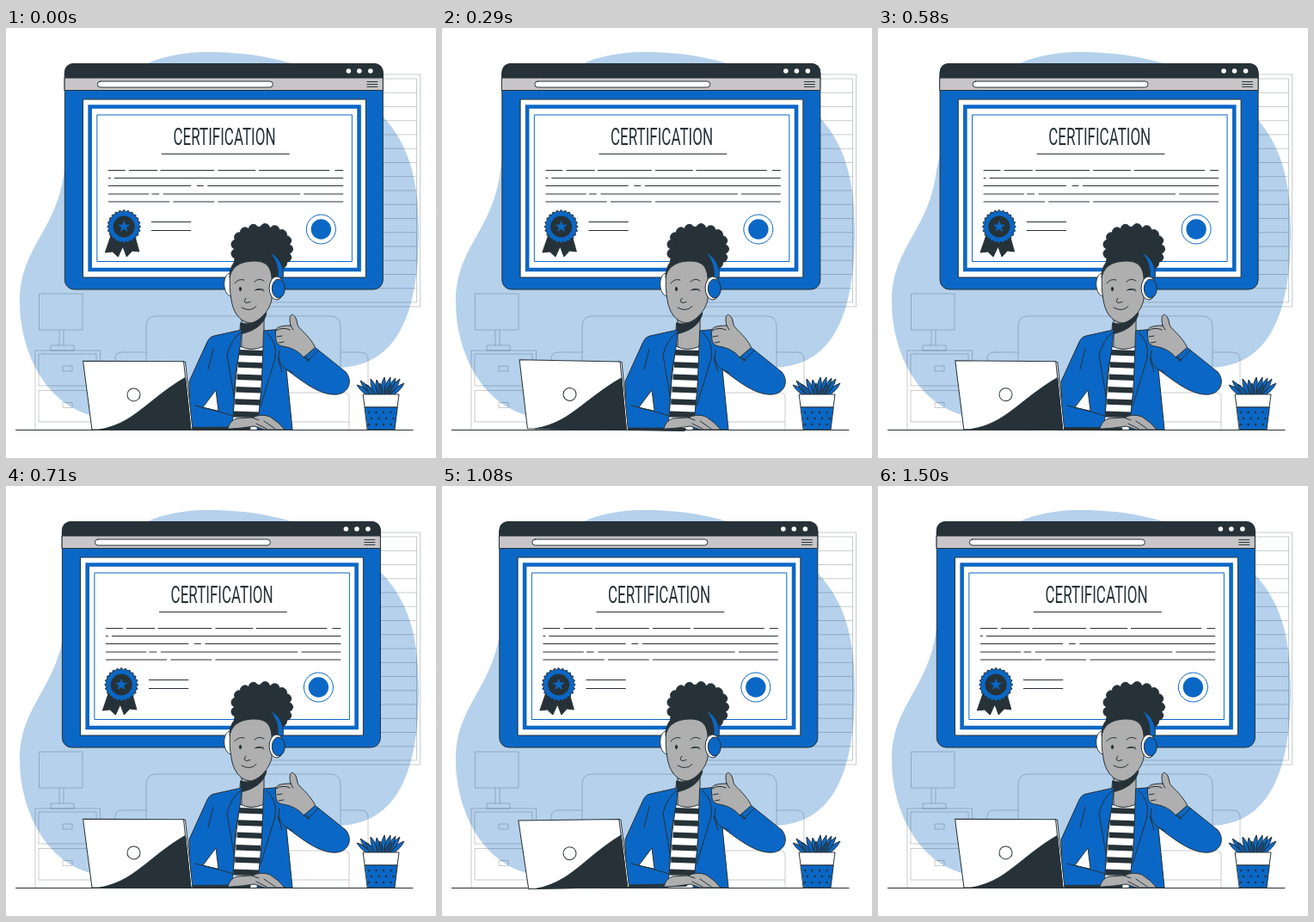
An HTML page for the animation above (1.54 s loop, 500x500 px).

```html
<!DOCTYPE html>
<html lang="en">
<head>
<meta charset="utf-8">
<title>Certification</title>
<style>
  html, body { margin: 0; width: 100%; height: 100%; overflow: hidden; background: #fff; }
  svg { display: block; width: 100vw; height: 100vh; }
  .ink { stroke: #263238; stroke-width: 1; stroke-linecap: round; stroke-linejoin: round; }
  .line { fill: none; }
  .room { fill: none; stroke: #263238; stroke-opacity: .25; }
  .blue { fill: #0b67c5; }
  .dark { fill: #263238; }
  .white { fill: #fff; }
  .skin { fill: #afafaf; }
  .frame { fill: none; stroke: #0b67c5; }
  .title { font: 400 27px Roboto, "Liberation Sans", sans-serif; text-anchor: middle; }
</style>
</head>
<body>
<svg viewBox="0 0 500 500">
  <path fill="#b5d1ec" d="M68 165C60 235 16 255 16 318C16 385 55 452 120 453C180 452 215 410 270 402C320 396 350 400 385 395C452 394 480 338 480 235C480 155 458 108 400 72C345 38 290 28 235 28C162 28 130 60 100 90C75 115 75 140 68 165Z"/>

  <g class="room">
    <path id="slats" d="M305 54H481.500V324H305ZM305 59H477.500V319H305Z"/>
    <path d="M38.500 309H89V351H38.500ZM62 351V369M67 351V369M52 369H79V375H52Z"/>
    <path d="M34 467V375H109.500V467M38 379H105V416H38ZM38 421.500H105V458H38ZM66 393H77V399H66ZM66 435.500H77V441.500H66Z"/>
    <path d="M163 430V347Q163 335 175 335H377Q389 335 389 347V424M127 467V385Q127 377 135 377H163M389 377H413Q421 377 421 385V467M325 424H393Q399 424 399 430V467M325 458H399"/>
  </g>

  <g id="window">
    <rect class="blue ink" x="68.500" y="41.500" width="370" height="262.500" rx="11"/>
    <path class="dark ink" d="M68.500 58V52.500Q68.500 41.500 79.500 41.500H427.500Q438.500 41.500 438.500 52.500V58Z"/>
    <path class="ink" fill="#c7c5c7" d="M68.500 58H438.500V72.500H68.500Z"/>
    <g class="white">
      <circle cx="398.500" cy="50" r="2.800"/><circle cx="411" cy="50" r="2.800"/><circle cx="424" cy="50" r="2.800"/>
    </g>
    <rect class="white ink" x="106.500" y="62" width="204" height="7" rx="3.500"/>
    <path class="ink" d="M420 62.500H432M420 65.500H432M420 68.300H432"/>

    <path class="white ink" d="M90 83H418.500V290H90Z"/>
    <path class="frame" stroke-width="4.600" d="M97.800 91.500H410.700V281H97.800Z"/>
    <path class="frame" d="M106 101H402.500V271.500H106Z"/>
    <text class="title dark" transform="translate(254.200 136) scale(.63 1)">CERTIFICATION</text>
    <path class="ink" d="M181.500 146.500H329.500M169.500 225.500H215M169.500 235.500H215"/>
    <path class="ink" d="M119.500 165.500H138.500M143.500 165.500H176M180 165.500H242M247 165.500H290M294.500 165.500H376M383 165.500H392
      M119.500 174.500H121.500M126.500 174.500H392
      M119.500 183.500H215M222.500 183.500H229.500M235 183.500H392
      M119.500 193H166M170 193H178M183.500 193H342M347 193H392
      M119.500 202H190M195 202H242M247 202H392"/>
    <circle class="frame" cx="366.500" cy="234" r="17"/>
    <circle class="blue" cx="366.500" cy="234" r="11.700"/>
    <path class="dark ink" d="M122 242L115.500 261L124 260L130.500 266L136 254L140.500 266L147 259L155 260L150 242Z"/>
    <polygon class="blue ink" id="badge"/>
    <circle class="dark" cx="137.300" cy="231" r="12.500"/>
    <polygon class="blue" id="star"/>
  </g>

  <path class="ink" d="M11.500 467.500H473"/>

  <g class="ink">
    <g class="dark" id="hair"><ellipse cx="297.500" cy="257" rx="31" ry="26"/></g>
    <path class="white" d="M261 285C251 285 251 311 262 312Z"/>
    <path class="skin" d="M274 338V372L283 385L300 372V330Z"/>
    <path class="dark" d="M273 343C284 347 295 339 303 331C300 346 287 353 272 356Z"/>
    <path class="dark" d="M260 290C260 272 272 262 290 262C310 262 320 275 319 292L309 312L285 290Z"/>
    <path class="skin" d="M260.500 288C264 275 276 271 289 271C303 271 308 278 309 290V316C306 330 293 343 283 343C271 341 264 330 262 316C260 306 260 297 260.500 288Z"/>
    <path class="blue" d="M307 261C318 266 324 278 322 291L316 290C317 279 314 270 307 261Z"/>
    <ellipse class="white" cx="314.800" cy="302.500" rx="8.700" ry="13.500"/>
    <ellipse class="blue" cx="316.800" cy="303" rx="7.500" ry="11"/>
    <ellipse class="dark" cx="272.500" cy="303.500" rx="1.100" ry="2.200"/>
    <path class="line" d="M266 297Q270 291 277 293M289 295Q294 290 300 294M289.500 305Q295 301 300 306M291 304.500L299 304M279 314Q275 319 280 319.500L284 318.500M274 325Q284 331 291 323.500"/>

    <path class="white" d="M272 370Q285 377 300 370L297 420L294 452H264L267 410Z"/>
    <path class="dark" id="stripes" stroke="none"/>
    <path class="blue" d="M274 351L242 358Q236 359 233 367L213 411L214 467H262L264 452L267 400L272 372Z"/>
    <path class="white" d="M229 441L244 421L247 445Z"/>
    <path class="blue" d="M300 352L316 350.500Q321 352 325 360L353 387L346 383L359.500 371.500L395 400C403 409 400 424 385 426C366 428 346 412 326 397L333 467H292L297 420Z"/>
    <path class="line" d="M273 354Q262 362 257 380L265 428M241 373L235 397M220 439Q245 445 264 451M303 354Q316 366 313 384L296 440M318 375Q314 390 326 397M326 397L334 401M350 388L363 375M316 384L321 400"/>
    <path class="skin" d="M331 346C329 338 330 333 333.500 333.500C340 338 337 344 341 348.500C349 356 357 365 359.500 371.500L346 383C340 375 330 371 321 370C313 368 314 362 313.500 356C312 348 318 346 331 346Z"/>
    <path class="line" d="M331 346L334 351M314 352Q322 347 330 351M315 359L321 358M317 366L323 365"/>
  </g>

  <g id="laptop" class="ink">
    <path class="dark" d="M215 464.500L283 464Q286 466 282 467H215Z"/>
    <path class="white" d="M205 387.500L208.500 388.500L217 467H210Z"/>
    <path class="white" d="M89.500 387.300L206.500 387.700L215 467H100Z"/>
    <path class="dark" d="M109 467C150 460 166 431 208.500 406.500L215 467Z"/>
    <circle class="line" cx="148.500" cy="426.500" r="7.500"/>
  </g>
  <g class="ink">
    <path class="skin" d="M258 466Q260 457 268 454L286 453Q297 448 307 452Q318 459 324 467H300L289 463L274 465Z"/>
    <path class="line" d="M286 453L294 456M291 460L303 466M300 457L313 466"/>
  </g>

  <g class="ink">
    <path class="blue" id="leaves"/>
    <path class="white" d="M415.500 426H457L455 441H417.500Z"/>
    <path class="blue" d="M417.300 441H455.200L452 467H420.500Z"/>
    <g class="dark" id="dots" stroke="none"></g>
  </g>
</svg>
<script>
const $ = id => document.getElementById(id);
const circle = (x, y, r) => `<circle cx="${x}" cy="${y}" r="${r}"/>`;
const range = n => [...Array(n).keys()];

function starPoints(cx, cy, tips, outer, inner) {
  return range(tips * 2).map(i => {
    const a = i * Math.PI / tips - Math.PI / 2, r = i % 2 ? inner : outer;
    return [cx + r * Math.cos(a), cy + r * Math.sin(a)];
  }).join(' ');
}

function leaf(x, y) {
  const baseX = 436 + (x - 436) * .3, baseY = 430;
  const dx = x - baseX, dy = y - baseY, len = Math.hypot(dx, dy);
  const nx = -dy / len * 5, ny = dx / len * 5;
  const mx = baseX + dx * .55, my = baseY + dy * .55;
  return `M${baseX} ${baseY}Q${mx + nx} ${my + ny} ${x} ${y}Q${mx - nx} ${my - ny} ${baseX} ${baseY}Z`;
}

$('badge').setAttribute('points', starPoints(137.3, 231, 24, 19.5, 17.5));
$('star').setAttribute('points', starPoints(137.3, 231, 5, 7.5, 3));
$('slats').setAttribute('d', $('slats').getAttribute('d') +
  range(15).map(i => `M305 ${59 + (i + 1) * 16.25}H477.5`).join(''));
// Slightly squared ring of curls
const squared = v => Math.sign(v) * Math.abs(v) ** .88;
$('hair').innerHTML += range(17).map(i => {
  const a = i / 17 * 2 * Math.PI;
  return circle(297.5 + 30.5 * squared(Math.cos(a)), 257 + 24 * squared(Math.sin(a)), 5.5);
}).join('');
$('stripes').setAttribute('d', range(6).map(i => {
  const y = 374 + i * 14.3, left = 271 - i * 1.2, right = 299 - i;
  return `M${left} ${y}L${right} ${y + 1}V${y + 7.5}L${left} ${y + 6.5}Z`;
}).join(''));
$('leaves').setAttribute('d', [[408, 415], [463, 413], [412, 410], [458, 408], [418, 414],
  [453, 407], [424, 408], [447, 406], [431, 409], [440, 406], [435, 413], [448, 415]]
  .map(p => leaf(...p)).join(''));
$('dots').innerHTML = range(12).map(i => {
  const row = i >> 2;
  return circle(422 + (i % 4) * 8.5 + (row % 2) * 3, 447 + row * 7, 1.2);
}).join('');

// Linear interpolation through [phase, value] stops
function along(stops, p) {
  const i = stops.findIndex(s => s[0] > p);
  const [p0, v0] = stops[i - 1], [p1, v1] = stops[i];
  return v0 + (v1 - v0) * (p - p0) / (p1 - p0);
}

const shake = [0, -1, 2, -4, 4, -4, 4, -4, 2, -1, 0].map((v, i) => [i / 10, v]);
const sway = [[0, 0], [.25, 1], [.75, -1], [1, 0]];
const LOOP = 1540, STEPS = 37;

function draw() {
  const step = Math.floor((performance.now() + 5) % LOOP / LOOP * STEPS);
  const phase = (step + .6) / 36 % 1;
  $('window').setAttribute('transform', `translate(${along(shake, phase)} 0)`);
  $('laptop').setAttribute('transform', `rotate(${along(sway, phase)} 187 427)`);
  requestAnimationFrame(draw);
}
draw();
</script>
</body>
</html>
```
